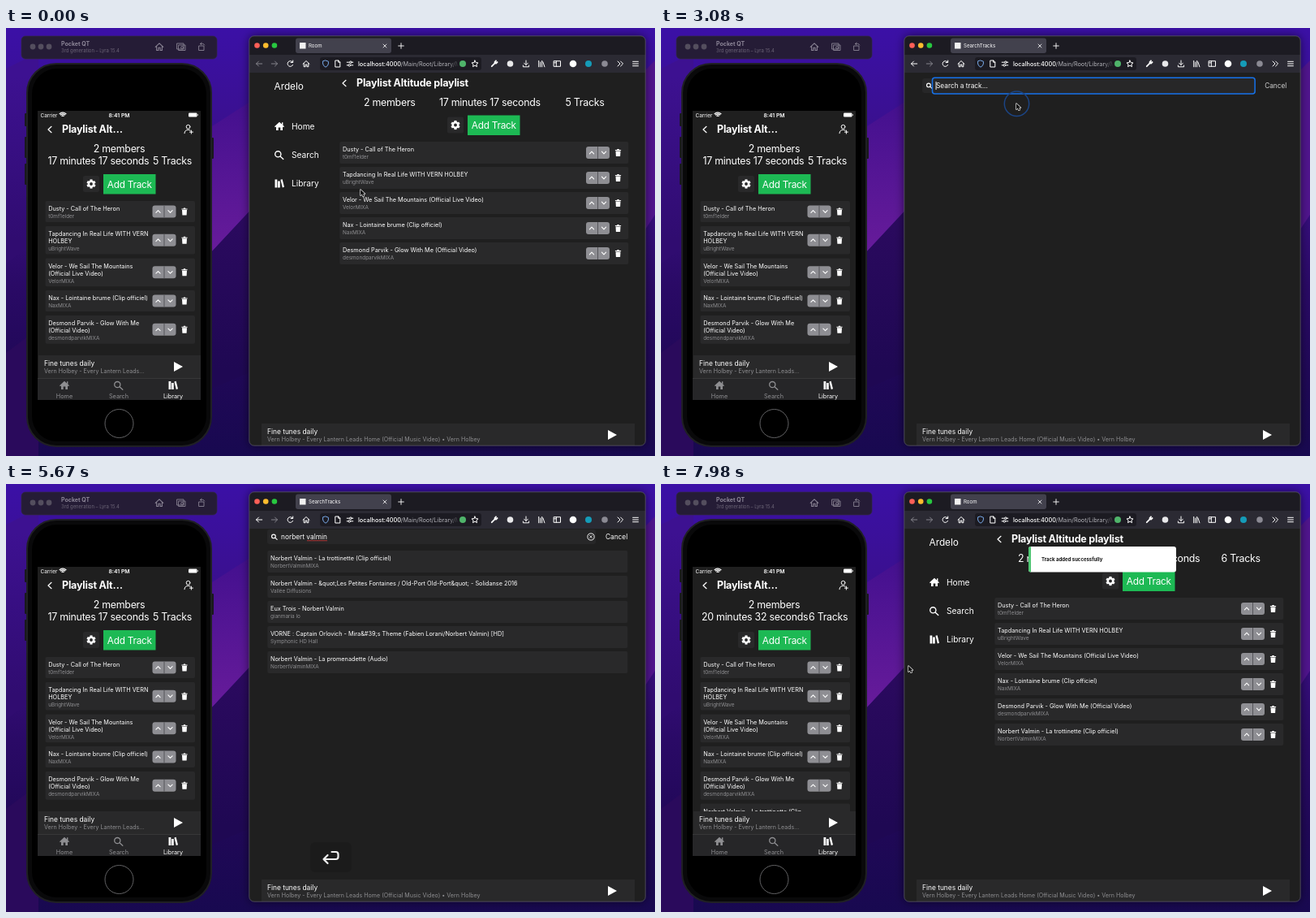
These frames come from a looping animation (800 by 527 pixels, 8000 ms). An HTML page with a canvas:

```html
<!DOCTYPE html>
<html lang="en">
<head>
<meta charset="utf-8">
<title>Shared playlist</title>
<style>
html, body { margin: 0; width: 100%; height: 100%; overflow: hidden; background: #000; }
canvas { display: block; }
</style>
</head>
<body>
<canvas id="stage" width="800" height="527"></canvas>
<script>
const ctx = document.getElementById('stage').getContext('2d');
const LOOP = 8000;
const PAGE = '#1f1f1f', CARD = '#29292a', GREY = '#8e8e91', WHITE = '#fff', GREEN = '#1db954';

// Moments of the story, in ms
const AT = { add: 1050, search: 1300, focus: 2880, cmd: 3700, paste: 4250, enter: 5200,
  results: 5480, pick: 6560, back: 6700, added: 7210 };

const tracks = [
  [['Dusty - Call of The Heron'], 't0mf1elder'],
  [['Tapdancing In Real Life WITH VERN', 'HOLBEY'], 'uBrightWave'],
  [['Velor - We Sail The Mountains', '(Official Live Video)'], 'VelorMIXA'],
  [['Nax - Lointaine brume (Clip officiel)'], 'NaxMIXA'],
  [['Desmond Parvik - Glow With Me', '(Official Video)'], 'desmondparvikMIXA'],
  [['Norbert Valmin - La trottinette (Clip', 'officiel)'], 'NorbertValminMIXA']
];
const results = [
  ['Norbert Valmin - La trottinette (Clip officiel)', 'NorbertValminMIXA'],
  ['Norbert Valmin - &quot;Les Petites Fontaines / Old-Port Old-Port&quot; - Solidanse 2016', 'Vallée Diffusions'],
  ['Eux Trois - Norbert Valmin', 'gianmaria lo'],
  ['VORNE : Captain Orlovich - Mira&#39;s Theme (Fabien Lorani/Norbert Valmin) [HD]', 'Symphonic HD Hall'],
  ['Norbert Valmin - La promenadette (Audio)', 'NorbertValminMIXA']
];

// Icon outlines, centred on 0,0
const icons = {
  chevLeft: 'M2-3.7-2 0 2 3.7',
  up: 'M-2.6 1.3 0-1.3 2.6 1.3',
  down: 'M-2.6-1.3 0 1.3 2.6-1.3',
  house: 'M-6 .3 0-5.2 6 .3 5 1.3 4 .5V5H1.3V1.5H-1.3V5H-4V.5L-5 1.3ZM3-4.8H4.4V-1.2L3-2.4Z',
  houseLine: 'M-4 .3 0-3.5 4 .3M-2.8-.5V3.7H-.9V1H.9V3.7H2.8V-.5',
  lens: 'M1.9-.9A3.6 3.6 0 1 1-5.3-.9A3.6 3.6 0 1 1 1.9-.9M1 1.8 4.8 5.2',
  books: 'M-5.5-5H-2.7V5H-5.5ZM-2-3H.8V5H-2ZM1.4-4.6 3.6-5.2 6 4.3 3.8 5Z',
  trash: 'M-3.6-3.6H-1.4L-1-4.6H1L1.4-3.6H3.6V-2.6H-3.6ZM-3-2H3L2.6 4.4H-2.6Z',
  play: 'M-5-6 6 0-5 6Z',
  back: 'M3.7 0H-3.5M-.5-3-3.5 0-.5 3',
  forward: 'M-3.7 0H3.5M.5-3 3.5 0 .5 3',
  reload: 'M3.1 1.4A3.4 3.4 0 1 1 2.5-2.3M3.2-4V-1.5H.6',
  shield: 'M0-4 3.4-2.8V0Q3 2.8 0 4.2Q-3 2.8-3.4 0V-2.8Z',
  sheet: 'M-2.8-4H.8L2.8-2V4H-2.8ZM.6-4V-1.8H2.8',
  sliders: 'M-3.8-1.8H-.5M2.2-1.8H3.8M-3.8 1.8H-2M.6 1.8H3.8M2.2-1.8A1.3 1.3 0 1 1-.4-1.8A1.3 1.3 0 1 1 2.2-1.8M.6 1.8A1.3 1.3 0 1 1-2 1.8A1.3 1.3 0 1 1 .6 1.8',
  star: 'M0-4 1.2-1.4 4-1.1 1.9.8 2.5 3.6 0 2.2-2.5 3.6-1.9.8-4-1.1-1.2-1.4Z',
  wrench: 'M-3.2 3.2.8-.8M3.6-2 2-.5.4-2 2-3.7',
  download: 'M0-4V1.4M-2.3-.8 0 1.5 2.3-.8M-3.6 2V3.8H3.6V2',
  shelf: 'M-3.3-3.6V3.8M-1.3-2V3.8M.7-3.6V3.8M1.9-2.2 3.9 3.8',
  panel: 'M-4-3.3H4V3.3H-4ZM-1.2-3.3V3.3M-4-1.2H-1.2',
  more: 'M-3-3 0 0-3 3M.6-3 3.6 0 .6 3',
  menu: 'M-3.4-2.7H3.4M-3.4 0H3.4M-3.4 2.7H3.4',
  close: 'M-2-2 2 2M2-2-2 2',
  plus: 'M-3.3 0H3.3M0-3.3V3.3',
  person: 'M2-2.8A2.4 2.4 0 1 1-2.8-2.8A2.4 2.4 0 1 1 2-2.8M-5 5.2Q-4.8.9-.4.9Q1.2.9 2.2 1.6M1.4 3.6H5.4M3.4 1.6V5.6',
  camera: 'M-5-4H3V3H-5ZM-3-2H5V4.5H-3ZM2.6 1.2A1.5 1.5 0 1 1-.4 1.2A1.5 1.5 0 1 1 2.6 1.2',
  rotate: 'M-3-1H3V4.5H-3ZM-1.5-3.5Q2.5-4.6 3.8-2M-1.5-3.5 0-5M-1.5-3.5 0-2.2',
  command: 'M-3-3H3V3H-3ZM-3-3H-5.7A2.7 2.7 0 1 1-3-5.7ZM3-3V-5.7A2.7 2.7 0 1 1 5.7-3ZM3 3H5.7A2.7 2.7 0 1 1 3 5.7ZM-3 3V5.7A2.7 2.7 0 1 1-5.7 3Z',
  enter: 'M-9 2H6Q9 2 9-1V-4Q9-7 6-7H1M-4-3-9 2-4 7',
  arrow: 'M0 0V8L1.9 6.3 3.3 9.2 4.8 8.5 3.5 5.7H6Z',
  beam: 'M-2-4.2Q0-4.2 0-3V3Q0 4.2-2 4.2M2-4.2Q0-4.2 0-3M0 3Q0 4.2 2 4.2M-1 1H1'
};
for (const k in icons) icons[k] = new Path2D(icons[k]);

const clamp = v => Math.max(0, Math.min(1, v));
const during = (t, from, to) => t >= from && t < to;
const easeOut = p => 1 - (1 - p) ** 3;
const smooth = p => p * p * (3 - 2 * p);

function box(x, y, w, h, r, fill, stroke, width = 1) {
  ctx.beginPath();
  ctx.roundRect(x, y, w, h, r);
  if (fill) { ctx.fillStyle = fill; ctx.fill(); }
  if (stroke) { ctx.strokeStyle = stroke; ctx.lineWidth = width; ctx.stroke(); }
}
const dot = (x, y, r, fill, stroke, width) => box(x - r, y - r, 2 * r, 2 * r, r, fill, stroke, width);

function text(s, x, y, size, color = WHITE, weight = 400, align = 'left', spacing = 0) {
  ctx.font = `${weight} ${size}px Inter, Roboto, sans-serif`;
  ctx.letterSpacing = spacing + 'px';
  ctx.textAlign = align;
  ctx.fillStyle = color;
  ctx.fillText(s, x, y);
}
const big = (s, x, y, align) => text(s, x, y, 12.4, WHITE, 400, align, -.27);
const heading = (s, x, y) => text(s, x, y, 12.5, WHITE, 700, 'left', -.2);

function icon(name, x, y, color = WHITE, width = 1, scale = 1) {
  ctx.save();
  ctx.translate(x, y);
  ctx.scale(scale, scale);
  ctx.lineCap = ctx.lineJoin = 'round';
  ctx.strokeStyle = ctx.fillStyle = color;
  ctx.lineWidth = width;
  width ? ctx.stroke(icons[name]) : ctx.fill(icons[name]);
  ctx.restore();
}

function poly(color, ...p) {
  ctx.beginPath();
  for (let i = 0; i < p.length; i += 2) ctx.lineTo(p[i], p[i + 1]);
  ctx.fillStyle = color;
  ctx.fill();
}

function shade(x0, y0, x1, y1, ...colors) {
  const g = ctx.createLinearGradient(x0, y0, x1, y1);
  colors.forEach((c, i) => g.addColorStop(i / (colors.length - 1), c));
  return g;
}

function wallpaper() {
  ctx.fillStyle = shade(0, 0, 0, 527, '#3b10a6', '#3a1092', '#380f80', '#2a0a66', '#200857', '#180950');
  ctx.fillRect(0, 0, 800, 527);
  // Lit slope behind the phone and the dark hills below it
  poly(shade(0, 90, 0, 270, '#43108f', '#661b9a'), 310, 85, 310, 215, 240, 290, 240, 130);
  poly(shade(0, 215, 0, 420, '#2c0a60', '#1f0853'), 310, 215, 310, 420, 240, 450, 240, 290);
  poly(shade(0, 60, 0, 260, '#3d1191', '#300c70'), 0, 50, 40, 30, 40, 260, 0, 290);
  poly('#2a0a5c', 0, 400, 40, 370, 40, 527, 0, 527);
  poly('#50158e', 780, 60, 800, 40, 800, 230, 780, 260);
}

function gear(x, y) {
  box(x - 10, y - 10, 20, 20, 2, '#29292a');
  ctx.strokeStyle = WHITE;
  ctx.lineCap = 'butt';
  ctx.lineWidth = 3;
  for (let i = 0; i < 3; i++) {
    const a = i * Math.PI / 3 + Math.PI / 6, c = 5.6 * Math.cos(a), s = 5.6 * Math.sin(a);
    ctx.beginPath();
    ctx.moveTo(x - c, y - s);
    ctx.lineTo(x + c, y + s);
    ctx.stroke();
  }
  dot(x, y, 4.4, WHITE);
  dot(x, y, 1.9, '#29292a');
}

function addButton(x, y) {
  box(x, y, 64.5, 24.5, 0, GREEN);
  text('Add Track', x + 32.3, y + 16.6, 11.8, WHITE, 400, 'center', -.22);
}

function rowControls(x, y) {
  box(x, y - 7.5, 29, 15, 3, '#8e8e93');
  box(x + 14, y - 7.5, 1, 15, 0, '#55555a');
  icon('up', x + 7, y, WHITE, 1.1);
  icon('down', x + 22, y, WHITE, 1.1);
  icon('trash', x + 39.5, y, WHITE, 0);
}

function card(x, y, w, h, lines, artist) {
  box(x, y, w, h, 2, CARD);
  lines.forEach((s, i) => text(s, x + 3.7, y + 12 + 9 * i, 7.3));
  text(artist, x + 3.7, y + 12 + 9 * lines.length, 6.4, GREY);
}

function player(x, y, w, sub, playX) {
  box(x, y, w, 28, 0, CARD);
  text('Fine tunes daily', x + 7, y + 12.5, 8.4);
  text(sub, x + 7, y + 22, 7.1, GREY);
  icon('play', playX, y + 14, WHITE, 0);
}

function simulatorBar() {
  box(19, 10, 241, 28, 5, '#251c36', '#32293f', .7);
  for (const x of [33, 43, 53]) dot(x, 23, 3.4, '#544e5e');
  text('Pocket QT', 68, 22, 7, '#8d8698', 700);
  text('3rd generation – Lyra 15.4', 68, 30, 5.9, '#6c6577');
  icon('houseLine', 189, 23, '#8a8494', .9, 1.2);
  icon('camera', 216, 23, '#8a8494', .9);
  icon('rotate', 241, 23, '#8a8494', .9);
}

function phone(added) {
  for (const [x, y, h] of [[23, 105, 16], [23, 134, 26], [23, 167, 26], [252, 135, 26]])
    box(x, y, 4, h, 1, '#19191c');
  box(26, 44, 227, 471, 36, '#09090a', '#202024', 2);
  box(32, 50, 215, 459, 31, '#000');
  dot(139.5, 487, 17.5, null, '#626264', 1);

  ctx.save();
  ctx.beginPath();
  ctx.rect(39, 102, 201, 356);
  ctx.clip();
  ctx.fillStyle = PAGE;
  ctx.fillRect(39, 102, 201, 356);
  text('Carrier', 42.5, 109.8, 6.4);
  for (const r of [2, 4, 5.8]) {
    ctx.beginPath();
    ctx.arc(70, 110, r, -2.4, -.74);
    ctx.strokeStyle = WHITE;
    ctx.lineWidth = 1.3;
    ctx.stroke();
  }
  text('8:41 PM', 139.5, 109.8, 6.8, WHITE, 600, 'center');
  box(225, 104.5, 10.5, 5, 1.2, WHITE);
  box(236, 106, 1, 2, 0, '#aaa');

  icon('chevLeft', 54, 125, WHITE, 1.2);
  heading('Playlist Alt…', 69, 129.3);
  icon('person', 225, 124.5, WHITE, 1);
  big('2 members', 139.5, 153, 'center');
  big((added ? '20 minutes 32' : '17 minutes 17') + ' seconds', added ? 50 : 51.5, 168);
  big((added ? 6 : 5) + ' Tracks', added ? 182 : 181, 168);
  gear(105, 192);
  addButton(120, 180);

  let y = 213;
  for (const [lines, artist] of tracks.slice(0, added ? 6 : 5)) {
    const h = lines.length > 1 ? 34.7 : 26;
    card(48.5, y, 184.5, h, lines, artist);
    rowControls(180.5, y + h / 2);
    y += h + 4.9;
  }

  player(40, 403, 200, 'Vern Holbey - Every Lantern Leads…', 212);
  box(39, 431, 201, 27, 0, '#262628');
  box(39, 431, 201, .7, 0, '#3c3c3e');
  [['house', 'Home', 72], ['lens', 'Search', 139], ['books', 'Library', 206]].forEach(([name, label, x], i) => {
    const color = i === 2 ? WHITE : GREY;
    icon(name, x, 440, color, i === 1 ? 1.3 : 0);
    text(label, x, 456, 7.3, color, 400, 'center');
  });
  ctx.restore();
}

function browserChrome(title, canGoBack) {
  box(300, 10, 488, 504, 6, PAGE);
  box(300, 10, 488, 23, [6, 6, 0, 0], '#1c1b22');
  box(300, 33, 488, 22, 0, '#2b2a33');
  ['#ff5f57', '#febc2e', '#28c840'].forEach((c, i) => dot(309.5 + 10.7 * i, 21.5, 3.3, c));
  box(357, 12.5, 118, 18.5, 3, '#42414d');
  box(362, 18, 7.5, 7.5, 0, '#f2f2f2');
  text(title, 373, 24, 6.1);
  icon('close', 467, 22, WHITE, .8);
  icon('plus', 487, 22, WHITE, .9);

  icon('back', 312, 44, canGoBack ? WHITE : '#85848c');
  icon('forward', 331, 44, '#85848c');
  icon('reload', 350.5, 44);
  icon('houseLine', 370, 44);
  box(387, 36, 199, 16, 3, '#1c1b22');
  icon('shield', 394, 44, '#78a9e8');
  icon('sheet', 409, 44);
  icon('sliders', 424, 44);
  text('localhost:4000', 434, 47, 7.3, WHITE, 500);
  const url = ctx.measureText('localhost:4000').width;
  text('/Main/Root/Library/M', 434 + url, 47, 7.3, shade(546, 0, 558, 0, '#b0b0b6', '#1c1b22'));
  dot(563, 44, 4, '#4fb36a');
  icon('star', 578, 44);
  icon('wrench', 602, 44, WHITE, 1.8);
  dot(621.5, 44, 3.8, '#e8e8ea');
  icon('download', 641, 44);
  icon('shelf', 660, 44);
  icon('panel', 679.5, 44);
  dot(699, 44, 4.3, WHITE);
  dot(718, 44, 4, '#159bb8');
  dot(738, 44, 3.8, '#8b8a94');
  icon('more', 757, 44);
  icon('menu', 776, 44);
}

function roomPage(added) {
  text('Ardelo', 330.5, 76, 11.8);
  [['house', 'Home'], ['lens', 'Search'], ['books', 'Library']].forEach(([name, label], i) => {
    const y = 121 + 35.2 * i;
    icon(name, 337, y, WHITE, i === 1 ? 1.4 : 0);
    text(label, 352, y + 3.8, 10.2);
  });
  icon('chevLeft', 417, 68, WHITE, 1.2);
  heading('Playlist Altitude playlist', 432, 72.3);
  big('2 members', added ? 440 : 441, 96);
  big((added ? '20 minutes 32' : '17 minutes 17') + ' seconds', added ? 533 : 534, 96);
  big((added ? 6 : 5) + ' Tracks', added ? 690.5 : 689.5, 96);
  gear(554, 119.5);
  addButton(569, 107.5);
  tracks.slice(0, added ? 6 : 5).forEach(([lines, artist], i) => {
    const y = 140 + 31 * i;
    card(411.3, y, 356, 27, [lines.join(' ')], artist);
    rowControls(715, y + 13.5);
  });
}

function searchPage(t) {
  const focused = t >= AT.focus;
  const p = easeOut(clamp((t - AT.focus) / 500));
  const y = 93 - 28 * p, slide = 24 * (1 - p);
  const right = focused ? 727 + slide : 596;
  if (!focused) {
    icon('chevLeft', 328, 68, WHITE, 1.2);
    heading('Add track', 343.5, 72.3);
  }
  box(322, y - 9, right - 322, 18, 3, '#272728');
  icon('lens', 331, y, WHITE, 1.8, .65);
  if (during(t, AT.focus, AT.enter)) box(334.5, y - 9.7, right - 334.5, 19.7, 3, '#272728', '#1672ea', 1.5);
  const typed = t >= AT.paste;
  text(typed ? 'norbert valmin' : 'Search a track...', 339, y + 3, 8.3);
  if (typed) {
    icon('close', 721, y, WHITE, .9, .8);
    dot(721, y, 4.1, null, WHITE, .9);
    if (t >= AT.paste + 200) box(371, y + 4.4, 25, .8, 0, '#d03a3a');
  }
  if (during(t, AT.focus, AT.enter) && (t - AT.focus) % 1200 < 600)
    box(typed ? 397 : 338.6, y - 5, .9, 10, 0, WHITE);
  if (focused) {
    ctx.globalAlpha = p;
    text('Cancel', 739 + slide, y + 3, 8.3);
    ctx.globalAlpha = 1;
  }
  if (t >= AT.results) results.forEach(([name, by], i) => card(322.3, 82 + 31 * i, 444, 27, [name], by));
}

function toast(t) {
  if (t < AT.added) return;
  const y = 77 - 70 * (1 - easeOut(clamp((t - AT.added) / 400)));
  box(453, y, 182, 31.5, 3, WHITE);
  box(453, y, 3, 31.5, [3, 0, 0, 3], '#4fc873');
  text('Track added successfully', 469, y + 17.7, 6, '#111', 700);
}

function keyCap(t, from, to, draw) {
  const a = clamp((to - t) / 300);
  if (t < from || !a) return;
  ctx.globalAlpha = a;
  box(375, 441, 51, 37, 6, 'rgba(0,0,0,.14)');
  draw();
  ctx.globalAlpha = 1;
}

function keys(t) {
  if (t < AT.paste) keyCap(t, AT.cmd, AT.paste + 300, () => icon('command', 400.5, 460, WHITE, 2));
  keyCap(t, AT.paste, 5000, () => {
    icon('command', 391, 460, WHITE, 2);
    text('V', 404, 468, 22);
  });
  keyCap(t, AT.enter, 5950, () => icon('enter', 400.5, 460, WHITE, 2.2));
}

// Pointer stops: time, x, y
const stops = [[0, 437, 199], [150, 437, 199], [900, 588, 116], [1500, 588, 116], [2200, 489, 97],
  [2300, 489, 97], [2700, 438, 93], [5950, 438, 93], [6400, 444.5, 97], [7000, 444.5, 97],
  [7800, 305, 224], [8000, 305, 224]];

function pointer(t) {
  const i = stops.findIndex(s => s[0] > t), [t0, x0, y0] = stops[i - 1], [t1, x1, y1] = stops[i];
  const p = smooth((t - t0) / (t1 - t0));
  const x = x0 + (x1 - x0) * p, y = y0 + (y1 - y0) * p;
  for (const c of [AT.add, AT.focus, AT.pick])
    if (during(t, c, c + 330)) dot(x + .5, y + .2, 15.2 * clamp(.6 + (t - c) / 200), null, '#1b4484', 1.5);
  if (during(t, AT.paste, 5950)) return;
  if (during(t, 2150, AT.focus)) return icon('beam', x, y + 2, '#d8d8d8', .9);
  icon('arrow', x, y, WHITE, 1.3, .92);
  icon('arrow', x, y, '#111', 0, .92);
}

function draw(t) {
  const searching = during(t, AT.search, AT.back), added = t >= AT.added;
  wallpaper();
  simulatorBar();
  phone(added);

  ctx.save();
  ctx.shadowColor = 'rgba(0,0,0,.6)';
  ctx.shadowBlur = 12;
  box(300, 10, 488, 504, 6, PAGE);
  ctx.restore();
  browserChrome(searching ? 'SearchTracks' : 'Room', during(t, AT.search, AT.added));
  ctx.save();
  ctx.beginPath();
  ctx.rect(300, 55, 488, 459);
  ctx.clip();
  searching ? searchPage(t) : roomPage(added);
  player(315, 487, 460, 'Vern Holbey - Every Lantern Leads Home (Official Music Video) • Vern Holbey', 747);
  toast(t);
  ctx.restore();
  box(299.8, 9.8, 488.4, 504.4, 6, null, '#5a5862', .8);
  keys(t);
  pointer(t);
}

function tick() {
  draw(performance.now() % LOOP);
  requestAnimationFrame(tick);
}
tick();
</script>
</body>
</html>
```
